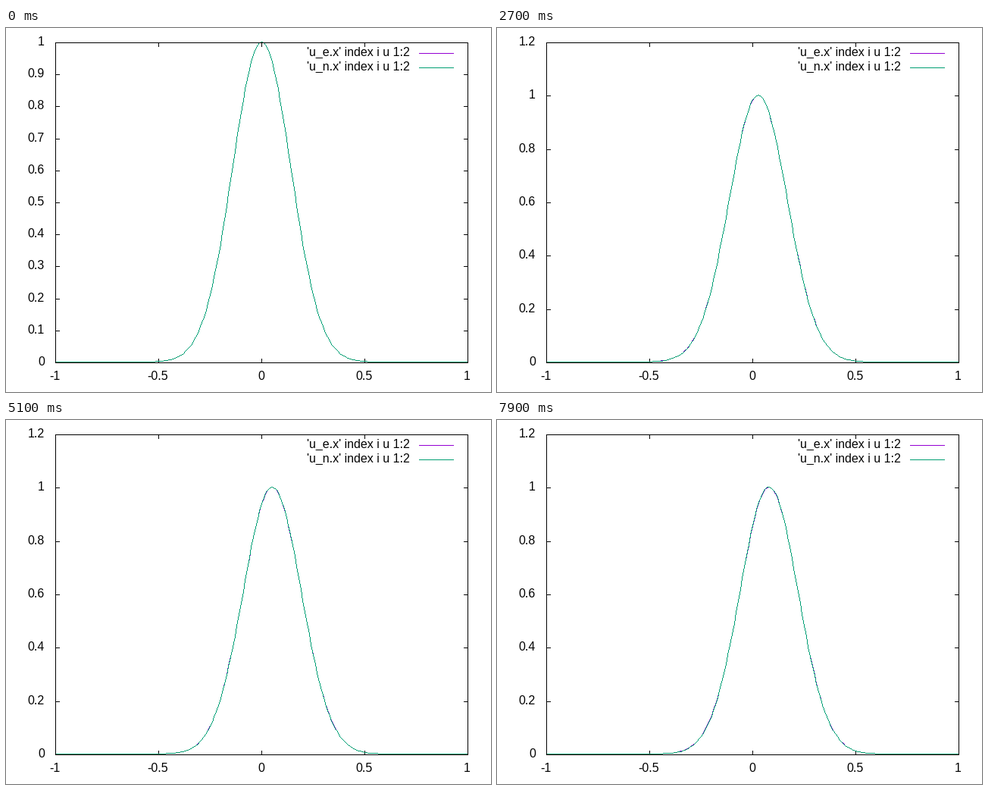
Recreate the animation shown at these times as a matplotlib script. Size 640 px wide and 480 px high, loop 8 s.

```python
import matplotlib.pyplot as plt
import numpy as np
from matplotlib.animation import FuncAnimation

W, H, DPI = 640, 480, 80
LEFT, RIGHT, TOP, BOTTOM = 65, 609, 19, 441
TICK = 5
FRAMES, INTERVAL = 80, 100
DT, DX = 0.001, 0.01
PURPLE, GREEN = "#9400d3", "#009e73"

plt.rcParams["font.family"] = "Liberation Sans"
plt.rcParams["text.hinting"] = "default"

x = np.linspace(-1, 1, 201)


def exact(n):
    return np.exp(-25 * (x - DT * n) ** 2)


def advect():
    """Forward-time, centred-space advection of the initial bell."""
    u = exact(0)
    states = []
    for _ in range(FRAMES):
        states.append(u.copy())
        u[1:-1] = u[1:-1] - DT / (2 * DX) * (u[2:] - u[:-2])
    return states


def col(v):
    return np.floor(LEFT + (v + 1) / 2 * (RIGHT - LEFT) + 0.5).astype(int)


def row(v, top):
    return BOTTOM - np.floor(v / top * (BOTTOM - TOP) + 0.5).astype(int)


def trace(d, k, n):
    return np.sign(d) * ((2 * abs(d) * k + n) // (2 * n))


def segment(x0, y0, x1, y1):
    """Pixels of a one-pixel line, walked along its longer side."""
    if abs(y1 - y0) > abs(x1 - x0) and y1 < y0:
        x0, y0, x1, y1 = x1, y1, x0, y0
    dx, dy = x1 - x0, y1 - y0
    n = max(abs(dx), abs(dy))
    k = np.arange(n + 1)
    return x0 + trace(dx, k, n), y0 + trace(dy, k, n)


def pixels(u, top):
    px, py = col(x), row(u, top)
    parts = [segment(*s) for s in zip(px[:-1], py[:-1], px[1:], py[1:])]
    return np.hstack(parts)


fig = plt.figure(figsize=(W / DPI, H / DPI), dpi=DPI, facecolor="white")
ax = fig.add_axes([0, 0, 1, 1])
ax.set(xlim=(0, W), ylim=(H, 0))
ax.axis("off")


def line(xs, ys, color="black", z=1):
    return ax.plot(xs, ys, color=color, lw=72 / DPI, aa=False, zorder=z)[0]


def label(px, py, s, ha):
    return ax.text(px, py, s, ha=ha, va="baseline", size=16 * 72 / DPI)


def y_axis(top, step):
    parts = []
    for v in np.arange(0, top + step / 2, step):
        r = row(v, top)
        parts += [line([LEFT, LEFT + TICK], [r, r]),
                  line([RIGHT - TICK, RIGHT], [r, r]),
                  label(51, r + 4, f"{round(v, 1):g}", "right")]
    return parts


scales = {1.0: y_axis(1.0, 0.1), 1.2: y_axis(1.2, 0.2)}

for v in (-1, -0.5, 0, 0.5, 1):
    c = col(v)
    line([c, c], [BOTTOM - TICK, BOTTOM])
    line([c, c], [TOP, TOP + TICK])
    label(c - 0.5, 464, f"{v:g}", "center")

curves = []
for name, color, r in (("u_e.x", PURPLE, 33), ("u_n.x", GREEN, 52)):
    label(533, r + 4, f"'{name}' index i u 1:2", "right")
    line([545, 590], [r, r], color, 2)
    curves += ax.plot([], [], ",", color=color, zorder=2)

line([LEFT, RIGHT, RIGHT, LEFT, LEFT], [TOP, TOP, BOTTOM, BOTTOM, TOP], z=3)

states = advect()


def update(n):
    u = states[n]
    top = 1.2 if round(u.max(), 6) > 1 else 1.0
    for key, parts in scales.items():
        for part in parts:
            part.set_visible(key == top)
    for curve, values in zip(curves, (exact(n), u)):
        curve.set_data(*pixels(values, top))
    return curves


anim = FuncAnimation(fig, update, frames=FRAMES, interval=INTERVAL,
                     repeat=True, repeat_delay=0)
plt.show()
```
